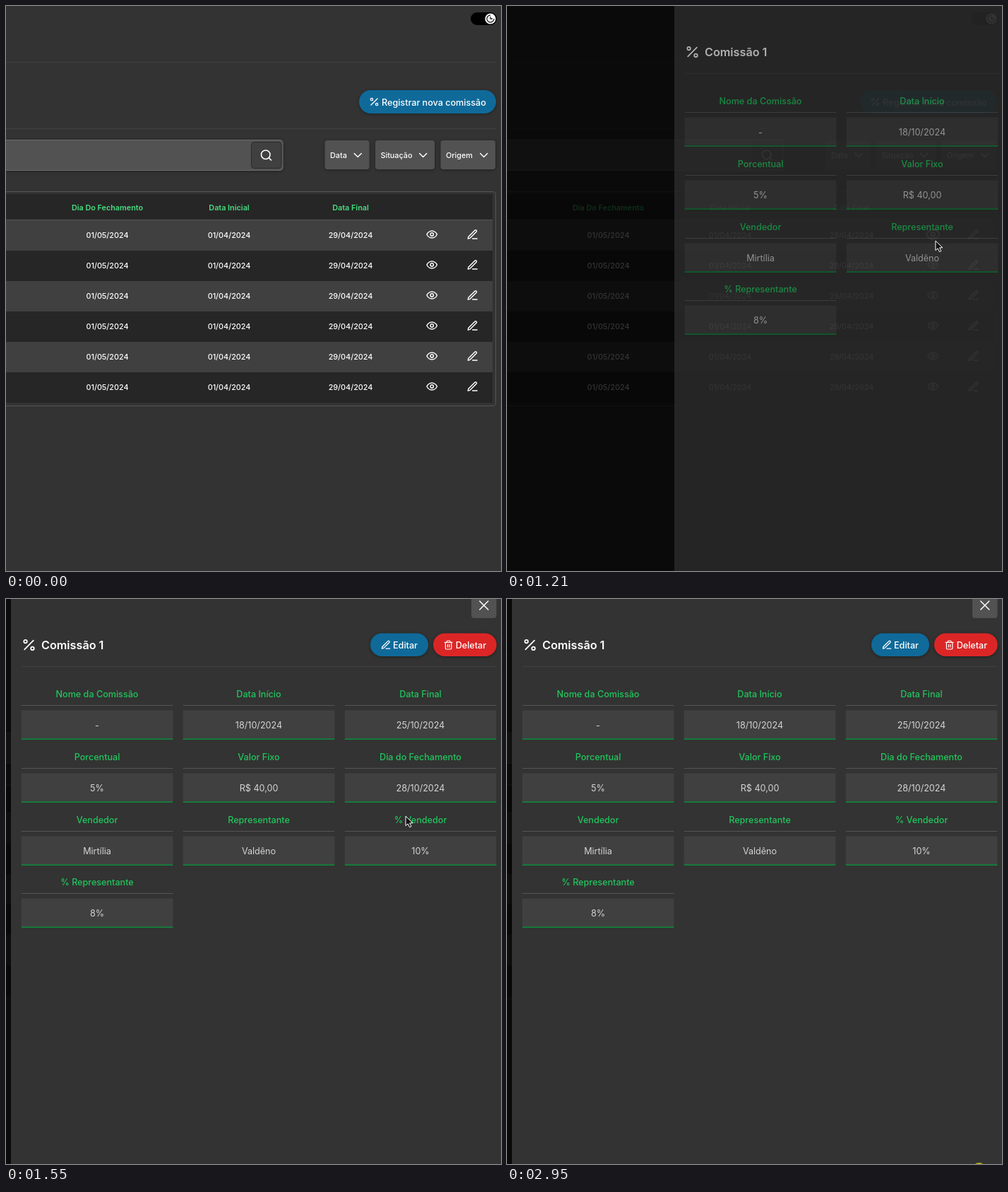
Write an HTML page that moves like this. It is 701 by 799 pixels and loops after 3030 ms.

```html
<!DOCTYPE html>
<html lang="pt-BR">
<head>
<meta charset="utf-8">
<title>Comissões</title>
<style>
  html, body { margin: 0; width: 100%; height: 100%; overflow: hidden; background: #333; }
  svg { display: block; font-family: Inter, sans-serif; }
  .icon { fill: none; stroke: #fff; stroke-width: 2; stroke-linecap: round; stroke-linejoin: round; }
  .raised { filter: drop-shadow(0 1px 2px rgba(0, 0, 0, .35)); }
</style>
</head>
<body>
<svg width="701" height="799" viewBox="0 0 701 799">
  <g id="page"></g>
  <rect id="backdrop" width="701" height="799" fill="#000" opacity=".8"/>
  <g id="panel"></g>
  <circle id="click" cx="668.5" cy="806" r="9" fill="#b3a51c"/>
  <path id="cursor" d="M.5 .5V14L3.7 11.2L6 16L8.4 15L6.2 10.2H10.5Z" fill="#111" stroke="#fff"/>
</svg>
<script>
const $ = id => document.getElementById(id);
const BLUE = '#0f6a9a', GREY = '#525252';

// 24-unit icons, centred on (12, 12)
const ICONS = {
  eye: 'M2 12s3-7 10-7 10 7 10 7-3 7-10 7-10-7-10-7ZM15 12a3 3 0 1 1-6 0 3 3 0 0 1 6 0Z',
  pen: 'M12 20h9M16.5 3.5a2.12 2.12 0 0 1 3 3L7 19l-4 1 1-4Z',
  percent: 'M19 5 5 19M9 6.5a2.5 2.5 0 1 1-5 0 2.5 2.5 0 0 1 5 0ZM20 17.5a2.5 2.5 0 1 1-5 0 2.5 2.5 0 0 1 5 0Z',
  search: 'M19 11a8 8 0 1 1-16 0 8 8 0 0 1 16 0ZM21 21l-4.3-4.3',
  chevron: 'M5 8.5l7 7 7-7',
  trash: 'M3 6h18M19 6v14a2 2 0 0 1-2 2H7a2 2 0 0 1-2-2V6M8 6V4a2 2 0 0 1 2-2h4a2 2 0 0 1 2 2v2M10 11v6M14 11v6',
  close: 'M4 4 20 20M20 4 4 20'
};

const place = (x, y, scale) => `translate(${x} ${y}) scale(${scale}) translate(-12 -12)`;
const icon = (name, x, y, scale = .72, id = '') =>
  `<path class="icon" ${id && `id="${id}"`} d="${ICONS[name]}" transform="${place(x, y, scale)}"/>`;
const rect = (x, y, right, bottom, fill, r = 0, extra = '') =>
  `<rect x="${x}" y="${y}" width="${right - x}" height="${bottom - y}" rx="${r}" fill="${fill}" ${extra}/>`;
const text = (label, x, y, size, weight, fill = '#fff', anchor = 'middle') =>
  `<text x="${x}" y="${y + size * .364}" font-size="${size}" font-weight="${weight}" fill="${fill}" text-anchor="${anchor}">${label}</text>`;
const startText = (label, x, y, size, weight) => text(label, x, y, size, weight, '#fff', 'start');
const RAISED = 'class="raised"';

function drawPage() {
  const columns = [143.5, 316, 488];
  let out = rect(0, 0, 701, 799, '#333')
    + rect(0, 79, 694, 80, '#404040') + rect(0, 173, 694, 174, '#404040')
    + rect(658, 9, 695, 27, '#000', 9)
    + '<circle cx="686" cy="18" r="7.6" fill="#fff"/>'
    + '<path d="M691 18a5 5 0 1 1-5-5M686 15v3h3" fill="none" stroke="#222" stroke-width="1.3"/>'
    + rect(500, 119, 694, 152, BLUE, 16.5, RAISED)
    + icon('percent', 521.5, 135.5, .65)
    + startText('Registrar nova comissão', 532, 136, 12.6, 500)
    + rect(-10, 189.5, 392, 232.5, GREY, 4, 'stroke="#6a6a6a" class="raised"')
    + rect(347.5, 192.5, 390, 229.5, '#404040', 4, 'stroke="#2a2a2a"')
    + icon('search', 368.5, 211, .78);

  for (const [label, left, right] of [['Data', 451.5, 514.5], ['Situação', 523, 607], ['Origem', 615.5, 693]])
    out += rect(left, 190, right, 231, GREY, 4, RAISED)
      + startText(label, left + 7.5, 211.5, 10.8, 500)
      + icon('chevron', right - 16.3, 211, .72);

  out += rect(-10, 262.5, 693.5, 565.5, 'none', 4, 'stroke="#555"')
    + rect(0, 266, 689, 302, '#262626') + rect(0, 302, 689, 303, '#555');
  ['Dia Do Fechamento', 'Data Inicial', 'Data Final'].forEach((label, i) =>
    out += text(label, columns[i], 285, 10.8, 600, '#4ade80'));

  for (let row = 0; row < 6; row++) {
    const y = 303 + row * 43;
    out += rect(0, y, 689, y + 43, row % 2 ? '#262626' : '#404040');
    ['01/05/2024', '01/04/2024', '29/04/2024'].forEach((date, i) =>
      out += text(date, columns[i], y + 21.5, 10.8, 500));
    out += icon('eye', 603.2, y + 20, .72, row ? '' : 'hoverEye') + icon('pen', 660.7, y + 20.3);
  }
  return out;
}

function drawPanel() {
  const fields = [
    ['Nome da Comissão', '-'], ['Data Início', '18/10/2024'], ['Data Final', '25/10/2024'],
    ['Porcentual', '5%'], ['Valor Fixo', 'R$ 40,00'], ['Dia do Fechamento', '28/10/2024'],
    ['Vendedor', 'Mirtília'], ['Representante', 'Valdêno'], ['% Vendedor', '10%'],
    ['% Representante', '8%']
  ];
  let out = rect(7, 0, 701, 799, '#323332')
    + icon('percent', 32.5, 65, .9) + startText('Comissão 1', 50, 65.3, 16.2, 600)
    + rect(22, 95, 694.5, 96, '#404040')
    + rect(659, -8, 694.5, 27, GREY, 4) + icon('close', 676.8, 9, .75)
    + rect(516, 48.5, 598, 81, BLUE, 16.2, RAISED)
    + icon('pen', 538, 65, .63) + startText('Editar', 548, 65.3, 12.6, 500)
    + rect(605, 48.5, 694.7, 81, '#dc2626', 16.2, RAISED)
    + icon('trash', 626.6, 65, .6) + startText('Deletar', 636.7, 65.3, 12.6, 500);

  fields.forEach(([label, value], i) => {
    const x = 21.7 + i % 3 * 229, y = Math.round(Math.floor(i / 3) * 88.8), middle = x + 107.3;
    out += text(label, middle, y + 134.5, 12.6, 500, '#22c55e')
      + rect(x, y + 150, x + 214.7, y + 151, '#555')
      + rect(x, y + 157.5, x + 214.7, y + 197.2, '#404040')
      + rect(x, y + 197.2, x + 214.7, y + 199, '#15803d')
      + text(value, middle, y + 178.3, 12.6, 400, '#d4d4d4');
  });
  return out;
}

$('page').innerHTML = drawPage();
$('panel').innerHTML = drawPanel();

// [start, number of equal holds until the next start]
const HOLDS = [[0, 1], [160, 7], [640, 6], [1060, 1], [1210, 2], [1360, 5], [1690, 8],
  [2250, 1], [2330, 5], [2680, 1], [2950, 1], [3030, 1]];
const LOOP = 3030;

// [time, x, y]
const CURSOR = [[160, 619, 740], [300, 608, 560], [430, 596, 430], [570, 600, 350], [640, 604, 336],
  [1060, 606, 332], [1430, 607, 331], [1560, 520, 280], [1690, 303, 195], [1760, 350, 90],
  [1830, 468, 40], [1900, 590, 85], [1970, 665, 200], [2040, 683, 330], [2110, 670, 480],
  [2250, 632, 697], [2400, 652, 745], [2680, 650, 801]];
// [time, offset, opacity]
const PANEL = [[1210, 230, .68], [1285, 32, .86], [1360, 1, .96], [1430, 0, 1]];
// [time, scale]
const EYE = [[640, .72], [850, .936]];

function hold(t) {
  const i = HOLDS.findIndex(([start]) => start > t) - 1;
  const [start, count] = HOLDS[i], step = (HOLDS[i + 1][0] - start) / count;
  return start + Math.floor((t - start) / step + .001) * step;
}

function track(keys, t) {
  const next = keys.findIndex(key => key[0] > t);
  if (next === 0) return keys[0].slice(1);
  if (next < 0) return keys[keys.length - 1].slice(1);
  const a = keys[next - 1], b = keys[next], k = (t - a[0]) / (b[0] - a[0]);
  return a.slice(1).map((v, i) => v + (b[i + 1] - v) * k);
}

const show = (id, visible) => $(id).setAttribute('visibility', visible ? 'visible' : 'hidden');

function render(now) {
  const t = hold(now % LOOP);
  const [offset, opacity] = track(PANEL, t);
  show('backdrop', t >= 1210);
  show('panel', t >= 1210);
  show('cursor', t >= 160 && t < 2680);
  show('click', t >= 2950);
  $('panel').setAttribute('transform', `translate(${offset} 0)`);
  $('panel').setAttribute('opacity', opacity);
  $('cursor').setAttribute('transform', `translate(${track(CURSOR, t)})`);
  $('hoverEye').setAttribute('transform', place(603.2, 323, track(EYE, t)[0]));
}

const begin = performance.now();
function loop() {
  render(performance.now() - begin);
  requestAnimationFrame(loop);
}
loop();
</script>
</body>
</html>
```
